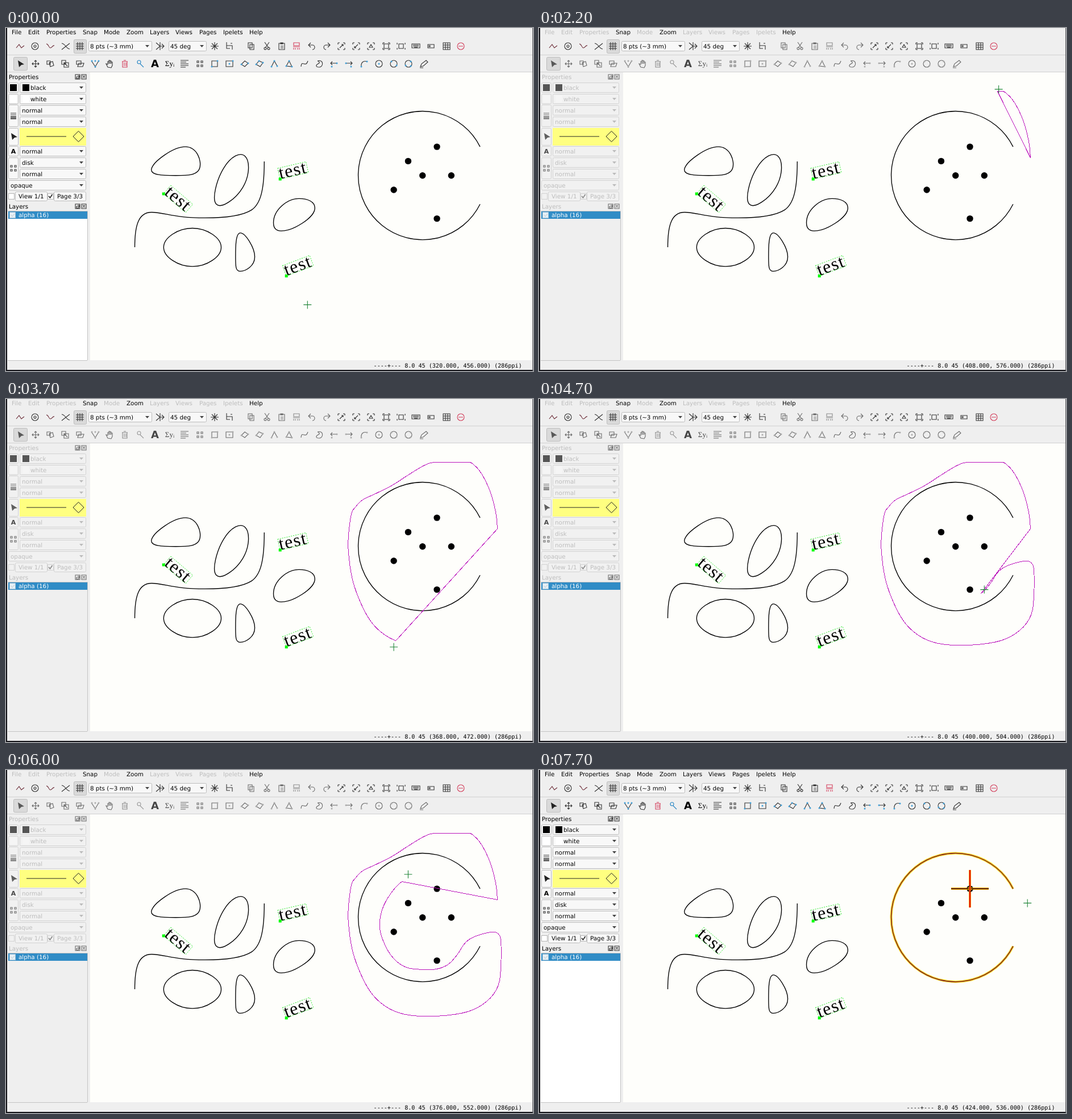
Write an HTML page that moves like this. It is 927x604 px and loops after 8000 ms.

```html
<!DOCTYPE html>
<html lang="en">
<head>
<meta charset="utf-8">
<title>Lasso selection</title>
<style>
html, body { margin: 0; height: 100%; overflow: hidden; background: #efefef; }
svg { display: block; width: 100vw; height: 100vh; }
text { font: 10.35px "DejaVu Sans", sans-serif; white-space: pre; text-rendering: geometricPrecision; }
#status { font: 10.08px "DejaVu Sans Mono", monospace; }
.word { font: 32px "Liberation Serif", serif; letter-spacing: 1.4px; }
.icon path { fill: none; stroke: #333; stroke-width: 1.1; }
.icon .solid { fill: #222; stroke: none; }
.icon .dots { stroke: #3f9fd8; stroke-width: 3; stroke-linecap: round; }
.icon .red { stroke: #d33f5c; }
.icon .dark { stroke: #6b2b36; }
.icon .blue { stroke: #2585c4; }
.big { font-weight: bold; font-size: 18px; }
.off .dim.icon, .off .dim .icon { filter: grayscale(1); opacity: .7; }
.off text.dim, .off .dim text:not(.glyph) { fill: #bdbdbd; }
.off .dim .swatch { fill: #555; }
.off .dim .white { fill: #f5f5f5; }
.off .dim .list { fill: #efefef; }
.off .dim .box { fill: #f1f1f1; stroke: #d2d2d2; }
.off .dim .arrow { fill: #bbb; }
.off .dim .tick { stroke: #888; }
.ink { fill: none; stroke: #000; stroke-width: 1.35; }
</style>
</head>
<body>
<svg id="stage" viewBox="0 0 927 604"></svg>
<script>
const stage = document.getElementById('stage');

// Snap grid of the page: 8 pt per cell
const cell = 25.3, left = 226.7, top0 = 234.4;
const px = ([i, j]) => [left + i * cell, top0 + j * cell];

const rect = (x, y, w, h, fill, more = '') =>
  `<rect x="${x}" y="${y}" width="${w}" height="${h}" fill="${fill}" ${more}/>`;
const text = (x, y, s, more = '') => `<text x="${x}" y="${y}" ${more}>${s}</text>`;
const path = (d, more = '') => `<path d="${d}" ${more}/>`;
const icon = (x, y, d, dots = '', kind = '', dim = true) =>
  `<g class="icon ${dim ? 'dim' : ''}" transform="translate(${x} ${y})">` +
  path(d, `class="${kind}"`) + (dots && path(dots, 'class="dots"')) + '</g>';
const button = (x, y, w, h, fill = '#f8f8f8') =>
  rect(x + .5, y + .5, w - 1, h - 1, fill, 'rx="2" stroke="#bdbdbd" class="box"');
const combo = (x, y, w, s, inset = 4) => button(x, y - 9, w, 18) +
  path(`M${x + w - 12} ${y - 2}h7l-3.5 4z`, 'class="arrow" fill="#444"') + text(x + inset, y + 4, s);

function menu() {
  const items = { File: 10, Edit: 39, Properties: 71, Snap: 135, Mode: 172, Zoom: 212,
    Layers: 253, Views: 298, Pages: 340, Ipelets: 382, Help: 428 };
  return Object.entries(items).map(([s, x]) =>
    text(x, 11, s, /Snap|Zoom|Help/.test(s) ? '' : 'class="dim"')).join('');
}

const frameD = 'M-6-6h3M-6-6v3M6-6h-3M6-6v3M-6 6h3M-6 6v-3M6 6h-3M6 6v-3';
const circleD = 'M-6 0a6 6 0 1 1 12 0a6 6 0 1 1-12 0';
const dotD = 'M-2 0a2 2 0 1 1 4 0a2 2 0 1 1-4 0';
const gridD = 'M-6-6h12v12h-12zM-6-2h12M-6 2h12M-2-6v12M2-6v12';
const pointerD = 'M-4-6L7 1L2 2L-2 6z';
const widthD = 'M-5-4h10M-5-1h10M-5 2h10M-5 3h10M-5 5h10M-5 6h10';
const marksD = 'M-5-5h3v3h-3zM2-5h3v3h-3zM-5 2h3v3h-3zM2 2h3v3h-3z';

function toolbars() {
  const top = [
    [25, 'M-7 3L-2-3L2 3L7-1', '', 'dark'],
    [51, circleD + dotD],
    [78, 'M-7-4C-3-4-3 3 0 3S4-2 7-1', '', 'dark'],
    [105, 'M-7-5C0-4 0 4 7 5M-7 6L7-5'],
    [130, 'M-7-4h14M-7 0h14M-7 4h14M-4-7v14M0-7v14M4-7v14'],
    [271, 'M-7-6L0 0L-7 6M0-7v14M0 0h7M3-4L7 0L3 4'],
    [367, 'M-7 0h14M0-7v14M-5-5L5 5M-5 5L5-5'],
    [393, 'M-5-7v6h10v7M-5-1v5h6M2-5h3'],
    [431, 'M-5-6h7v9h-7zM-2-3h7v9h-7z'],
    [459, 'M-4-7L3 3M4-7L-3 3M-5 4a2 2 0 1 1 4 0a2 2 0 1 1-4 0M1 4a2 2 0 1 1 4 0a2 2 0 1 1-4 0'],
    [485, 'M-5-5h10v11h-10zM-2-6h4v2h-4zM-2 0h5M-2 3h5'],
    [511, 'M-5-6h10v5h-10zM-6 1h12M-5 3v3M-2 3v3M2 3v3M5 3v3', '', 'red'],
    [538, 'M-5-2h6a4 4 0 0 1 0 8M-2-6L-6-2L-2 2'],
    [564, 'M5-2h-6a4 4 0 0 0 0 8M2-6L6-2L2 2'],
    [590, frameD + 'M-3 3L3-3M0-3h3v3'],
    [616, frameD + 'M-3 3L3-3M-3 0v3h3'],
    [642, frameD + 'M-3 2L0-3L3 2z'],
    [669, frameD + 'M-4-4h8v8h-8z'],
    [695, 'M-7-6v3M-7 6v-3M7-6v3M7 6v-3M-4-4h8v8h-8z'],
    [721, 'M-7-4h14v7h-14zM-5-2h10M-5 0h10M-3 2h6'],
    [748, 'M-6-3h11v6h-11zM-4-1h2v2h-2z'],
    [775, gridD],
    [800, circleD + 'M-4 0h8', '', 'red']
  ];
  const bottom = [
    [25, pointerD, '', 'solid'],
    [52, 'M-6 0h12M0-6v12M-4-2L-6 0L-4 2M4-2L6 0L4 2M-2-4L0-6L2-4M-2 4L0 6L2 4'],
    [78, 'M-6-5h6v6h-6zM-2-2L4-4L6 3L0 5z'],
    [104, 'M-6-6h7v7h-7zM-2-2h8v8h-8zM-2-2L4 4'],
    [130, 'M-6-5h8v6h-8zM-2-1h9l-2 6h-9z'],
    [157, 'M-6-4L0 5L6-5M0 5v2', 'M-6-5h0M0-5h0M6-5h0M0 5h0'],
    [183, 'M-4 6L-7 0L-4 1V-4h2v4V-6h2v6V-5h2v5V-3h2v6L2 7z'],
    [209, 'M-5-4h10M-2-6h4M-4-4v10h8v-10M-1-2v6M2-2v6', '', 'red'],
    [236, 'M-5-3a3 3 0 1 1 6 0a3 3 0 1 1-6 0M0 0L6 6', '', 'blue'],
    [314, 'M-7-6h14M-7-3h10M-7 0h14M-7 3h14M-7 6h9'],
    [341, marksD],
    [367, 'M-5-5h10v10h-10z', 'M-5 5h0M5-5h0'],
    [393, 'M-6-5h12v10h-12z', 'M0 0h0M6-5h0'],
    [420, 'M-6 1L0-5L6-1L0 5z', 'M-6 1h0M6-1h0'],
    [446, 'M-6 1L-1-5L6-2L1 5z', 'M-1-5h0M6-2h0M-6 1h0'],
    [472, 'M-5 5L0-5L5 4', 'M-5 5h0M0-5h0M5 4h0'],
    [498, 'M-5 4L0-5L5 5z', 'M-5 4h0M0-5h0M5 5h0'],
    [525, 'M-6 5C-5-8 2 8 6-5'],
    [551, 'M-3-5C9-8 7 6 0 6S-6 2-2 0S0-4-3-5'],
    [577, 'M-6-1h12M-3-4L-6-1L-3 2', 'M-4 5h0M5-1h0'],
    [603, 'M-6-1h12M3-4L6-1L3 2', 'M4 5h0M-5-1h0'],
    [630, 'M-5 6C-6-2-2-6 5-4', 'M-5 5h0M5-4h0'],
    [656, circleD, 'M0 0h0'],
    [682, circleD, 'M-4-4h0M5 3h0'],
    [708, circleD, 'M-5 3h0M4-4h0M4 4h0'],
    [735, 'M-6 5L-4 0L4-6L7-3L-1 4zM-7 7h6']
  ];
  const alwaysOn = x => x < 400 || x > 580;
  return button(119, 20, 23, 25, '#dadada') + button(13, 51, 25, 24, '#dadada') +
    combo(145, 32, 112, '8 pts (~3 mm)', 3) + combo(286, 32, 67, '45 deg', 3) +
    top.map(([x, d, dots, kind]) => icon(x, 32, d, dots, kind, !alwaysOn(x))).join('') +
    bottom.map(([x, d, dots, kind]) => icon(x, 63, d, dots, kind)).join('') +
    '<g class="icon dim">' + text(262, 69, 'A', 'class="glyph big" text-anchor="middle"') +
    text(288, 67, 'Σy<tspan font-size="8" dy="1">i</tspan>',
      'class="glyph" text-anchor="middle" style="font-family:Liberation Serif,serif;font-size:13px"') + '</g>';
}

function panels() {
  const title = (y, s) => text(5, y + 4, s) + icon(126, y, 'M-4-4h8v8h-8zM-2 0h4v3h-4zM0-2h3v3') +
    icon(137, y, 'M-4-4h8v8h-8zM-2-2L2 2M-2 2L2-2');
  const check = (x, on) => rect(x + .5, 291.5, 10, 10, '#fff', 'stroke="#b5b5b5" class="box"') +
    (on ? path(`M${x + 2} 296l2.5 3l4-6`, 'class="tick" fill="none" stroke="#222" stroke-width="1.6"') : '');
  const rows = [[105, 'black', 19], [125, 'white', 19], [145, 'normal'], [165, 'normal'],
    [217, 'normal'], [237, 'disk'], [257, 'normal']];
  const sides = [[96, 18], [116, 18], [135, 39], [176, 31], [208, 18], [228, 38]];
  return '<g class="dim">' + rect(3, 323, 140, 262, '#fff', 'class="list"') +
    title(86, 'Properties') + title(314, 'Layers') +
    sides.map(([y, h]) => button(4, y, 18, h)).join('') +
    rows.map(([y, s, inset]) => combo(24, y, 117, s, inset)).join('') + combo(4, 277, 137, 'opaque') +
    rect(7, 99, 12, 12, '#000', 'class="swatch"') + rect(29, 99, 12, 12, '#000', 'class="swatch"') +
    rect(7, 119, 12, 12, '#fff', 'class="white"') + rect(29, 119, 12, 12, '#fff', 'class="white"') +
    icon(13, 154, widthD) + icon(13, 191, pointerD, '', 'solid') + icon(13, 247, marksD) +
    '<g class="icon">' + text(13, 221, 'A',
      'class="glyph" text-anchor="middle" style="font-size:11px;font-weight:bold"') + '</g>' +
    check(4) + button(16, 288, 57, 17) + text(22, 300, 'View 1/1') +
    check(73, true) + button(84, 288, 57, 17) + text(90, 300, 'Page 3/3') + '</g>' +
    rect(24, 176, 117, 31, '#ffff80') +
    path('M36 191H106M118 191l9.5-9.5l9.5 9.5l-9.5 9.5z', 'fill="none" stroke="#222"') +
    rect(4, 323, 139, 13, '#308cc6') + rect(6.5, 324.5, 10, 10, '#e6f0f6', 'stroke="#a9c5d8"') +
    path('M9 329l2 3l4-5', 'fill="none" stroke="#c3ccd2"') +
    text(22, 333, 'alpha (16)', 'style="fill:#fff"') +
    path('M3 322.5H143.5V585M3 585.5H143', 'fill="none" stroke="#c4c4c4"');
}

const arc = `M${px([24, -1])}A113.14 113.14 0 1 0 ${px([24, 3])}`;

// Closed uniform cubic B-spline over grid points
function spline(grid) {
  const p = grid.map(px), n = p.length;
  const mix = (i, ...w) => [0, 1].map(k => w.reduce((sum, f, m) => sum + f * p[(i + m) % n][k], 0));
  return 'M' + mix(0, 1 / 6, 2 / 3, 1 / 6) + p.map((_, i) =>
    'C' + [mix(i + 1, 2 / 3, 1 / 3), mix(i + 1, 1 / 3, 2 / 3), mix(i + 1, 1 / 6, 2 / 3, 1 / 6)]).join('') + 'Z';
}

function drawing() {
  const word = (x, y, angle) => `<g transform="translate(${x} ${y}) rotate(${angle})">` +
    text(0, 0, 'test', 'class="word"') +
    rect(0, -19.5, 51, 19.5, 'none', 'stroke="#2be82b" stroke-width=".9" stroke-dasharray="2 2"') + '</g>' +
    rect(x - 2.5, y - 2.5, 5, 5, '#0f0');
  const spots = [[21, -1], [19, 0], [20, 1], [22, 1], [18, 2], [21, 4]].map(px);
  const outlines = [
    spline([[0, 1], [3, 1], [5, 1], [4, -2]]),
    spline([[8, -1], [8, 2], [5, 4], [6, 0]]),
    spline([[7, 4], [7, 7], [7, 8], [9, 7]]),
    spline([[1, 6], [4, 4], [7, 6], [4, 8]]),
    'M515.5 300.3C495 300.3 470.5 320 470.5 343C470.5 352 475 357.3 484 357.3C505 357.3 543.3 334 543.3 317C543.3 306 531 300.3 515.5 300.3Z',
    'M226.5 386C226.5 350 232 324.5 256 324.5C282 325.3 295 334.4 350 334.4C390 334.4 418 329.4 432 320.4C449 309 454.3 281 454.3 235',
    arc
  ];
  return outlines.map(d => path(d, 'class="ink"')).join('') +
    spots.map(([x, y]) => `<circle cx="${x}" cy="${y}" r="5.7"/>`).join('') +
    word(482.2, 266, -13) + word(277.2, 292, 40.5) + word(493.2, 436.7, -20.7);
}

function selection() {
  const [x, y] = px([21, -1]);
  const line = (d, color, w) => path(d, `fill="none" stroke="${color}" stroke-width="${w}"`);
  const across = `M${x - 33} ${y}h66`, down = `M${x} ${y - 33}v66`;
  return '<g id="selected">' + line(arc, '#ffe01a', 4) + line(arc, '#7a1a2c', 1.5) +
    line(across, '#ffb300', 4) + line(across, '#5a2a00', 2) +
    line(down, '#ffb300', 4) + line(down, '#e01010', 2.4) +
    `<circle cx="${x}" cy="${y}" r="5" fill="none" stroke="#111" stroke-dasharray="3 2"/></g>`;
}

stage.innerHTML = rect(0, 0, 927, 604, '#efefef') + rect(148, 78, 778, 507, '#fefefb') +
  path('M2 47.5H926M2 77.5H926', 'stroke="#d0d0d0"') +
  menu() + toolbars() + panels() + drawing() + selection() +
  path('', 'id="lasso" fill="none" stroke="#bb14bb" shape-rendering="crispEdges" transform="translate(.5 .5)"') +
  path('M-7 0H7M0-7V7', 'id="cross" stroke="#208538" stroke-width="1.1"') +
  text(646.6, 597.6, '', 'id="status"') +
  rect(0, 0, 2, 604, '#15151a') + rect(0, 602, 927, 2, '#15151a') + rect(926, 0, 1, 604, '#55555a');

// Points along the lasso, joined by a smooth curve
const pen = [
  [864,228],[861,199],[851,162],[836,131],[822,115],[813,111],[783,111],[753,111],[734,117],
  [706,134],[678,152],[652,165],[627,177],[615,189],[607,202],[602,240],[602,270],[609,318],
  [625,362],[645,396],[674,420],[711,431.5],[763,432.5],[812,425],[845,407],[865,380],[870,345],
  [870,300],[864,287],[852,285],[826,292],[808,303],[793,325],[777,342],[757,350],[733,351],
  [701,346],[676,325],[660,292],[657,266],[664,238],[680,212],[696,196],[704,197],[711,207],
  [716,226],[726,236],[747,240],[764,236],[780,222],[785,212],[798,204],[825,209],[856,228]
];
// Time and position along the pen points
const pace = [[1500, 0], [2400, 6.8], [3000, 14], [3300, 15.4], [4200, 26.5], [4700, 33],
  [6000, 42], [6800, 50], [7500, 53]];
// Time and grid cell of the free pointer
const moves = [[0, 12, 10], [100, 13, 9], [200, 13, 8], [1000, 14, 7],
  [1100, 15, 6], [1200, 17, 5], [1300, 26, 0], [1400, 25, 0]];

function progress(t) {
  const i = pace.findIndex(([end]) => t < end);
  if (i < 0) return pen.length - 1;
  const [[t0, u0], [t1, u1]] = [pace[i - 1], pace[i]];
  return u0 + (u1 - u0) * (t - t0) / (t1 - t0);
}

function penAt(u) {
  const i = Math.min(Math.floor(u), pen.length - 2), f = u - i;
  const at = k => pen[Math.max(0, Math.min(pen.length - 1, k))];
  return [0, 1].map(k => {
    const [a, b, c, d] = [-1, 0, 1, 2].map(n => at(i + n)[k]);
    return b + f / 2 * (c - a + f * (2 * a - 5 * b + 4 * c - d + f * (3 * (b - c) + d - a)));
  });
}

const [lasso, cross, status, selected] =
  ['lasso', 'cross', 'status', 'selected'].map(id => document.getElementById(id));

function render(time) {
  const t = Math.floor(time / 100) * 100;
  let [, col, row] = moves.findLast(([start]) => start <= t);
  let d = '';
  if (t >= 1600) {
    const u = progress(t), points = [];
    for (let s = 0; s < u; s += .25) points.push(penAt(s));
    const tip = penAt(u);
    points.push(tip);
    col = Math.round((tip[0] - left) / cell);
    row = Math.round((tip[1] - top0) / cell);
    if (t < 7700) d = 'M' + points.map(p => p.map(v => v.toFixed(1))).join('L') + 'Z';
  }
  lasso.setAttribute('d', d);
  cross.setAttribute('transform', `translate(${px([col, row])})`);
  status.textContent = `----+--- 8.0 45 (${224 + 8 * col}.000, ${536 - 8 * row}.000) (286ppi)`;
  selected.style.display = t >= 7700 ? '' : 'none';
  stage.classList.toggle('off', t >= 700 && t < 7700);
}

function tick() {
  render(performance.now() % 8000);
  requestAnimationFrame(tick);
}
tick();
</script>
</body>
</html>
```
